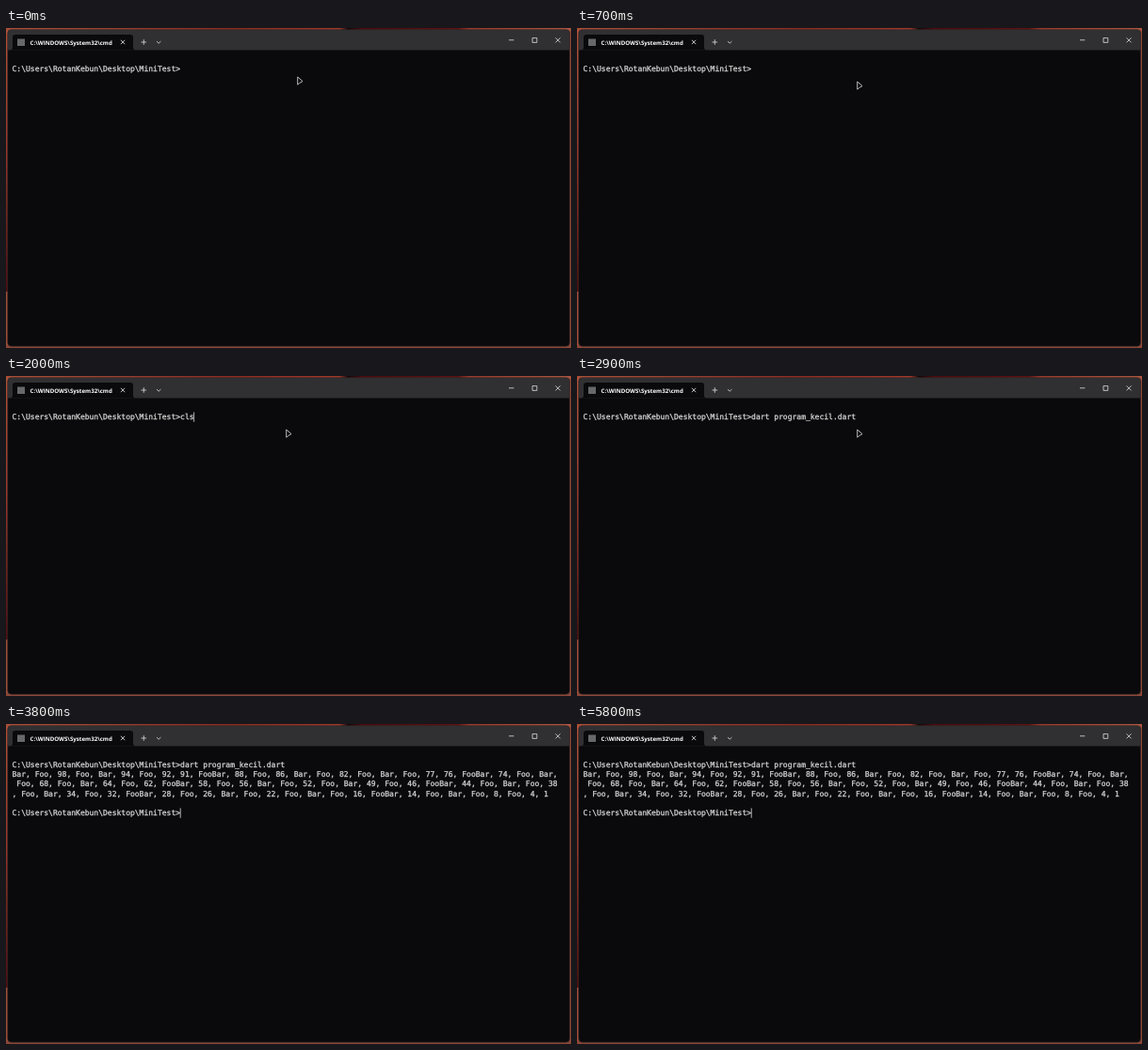
Write an HTML page that moves like this. It is 600 by 340 pixels and loops after 6000 ms.

```html
<!DOCTYPE html>
<html lang="en">
<head>
<meta charset="utf-8">
<title>Terminal</title>
<style>
  html, body { margin: 0; width: 100%; height: 100%; overflow: hidden; background: #a04c38; }
  svg { display: block; }
  text { white-space: pre; text-rendering: geometricPrecision; }
  #screen { font: 8.02px "DejaVu Sans Mono", monospace; fill: #d4d4d4; stroke: #d4d4d4; stroke-width: .28px; }
  .title { font: 700 6.15px "Open Sans", sans-serif; fill: #fff; }
  .icons { fill: none; stroke: #e0e0e0; stroke-width: .8; }
</style>
</head>
<body>
<svg width="600" height="340" viewBox="0 0 600 340">
  <defs>
    <linearGradient id="top">
      <stop offset="0" stop-color="#a84f38"/>
      <stop offset=".2" stop-color="#96402f"/>
      <stop offset=".4" stop-color="#8e2a20"/>
      <stop offset=".59" stop-color="#a03a2a"/>
      <stop offset=".605" stop-color="#140608"/>
      <stop offset=".63" stop-color="#4a0c0e"/>
      <stop offset=".8" stop-color="#5c1212"/>
      <stop offset=".82" stop-color="#9a3a2a"/>
      <stop offset="1" stop-color="#a85640"/>
    </linearGradient>
    <linearGradient id="side" x2="0" y2="1">
      <stop offset="0" stop-color="#b0523a"/>
      <stop offset=".45" stop-color="#97382a"/>
      <stop offset="1" stop-color="#4c0c0e"/>
    </linearGradient>
  </defs>
  <rect width="600" height="340" fill="#a04c38"/>
  <rect width="600" height="3" fill="url(#top)"/>
  <rect y="2" width="3" height="278" fill="url(#side)"/>
  <rect y="337" width="600" height="3" fill="#8a4636"/>

  <rect x="1.7" y="1.7" width="597" height="336.5" rx="4" fill="#0a090b" stroke="#3c2f2f" stroke-width=".6"/>
  <path d="M2 23.5V6a4 4 0 0 1 4-4H594.5a4 4 0 0 1 4 4V23.5Z" fill="#302f31"/>
  <path d="M4 23.5q3 0 3-3V10q0-3 3-3H132q3 0 3 3V20.5q0 3 3 3Z" fill="#0a090b"/>
  <rect x="12" y="11.5" width="8" height="7.5" fill="#66686a"/>
  <text class="title" x="25.5" y="17.7">C:\WINDOWS\System32\cmd</text>
  <g class="icons">
    <path d="M121.8 12.8l4.4 4.4m0-4.4l-4.4 4.4M143.5 15h5.6M146.3 12.2v5.6M160 14.2l2.2 2 2.2-2"/>
    <path d="M534 12.8h5.4M559 10.6h4.8v4.8h-4.8ZM583.6 10.4l5 5m0-5l-5 5"/>
  </g>

  <g id="screen"></g>
  <rect id="caret" width=".9" height="10.4" fill="#c4c4c4"/>
  <path id="pointer" d="M.7.6V8.8L2.7 7.1 6 5.2Z" fill="#0a090b" stroke="#cfcfcf" stroke-width=".9" stroke-linejoin="round"/>
</svg>
<script>
const LOOP = 6000, LEFT = 6.5, TOP = 38.4, COL = 4.828, ROW = 10.2, COLS = 120;
const PROMPT = "C:\\Users\\RotanKebun\\Desktop\\MiniTest>";
const COMMAND = "dart program_kecil.dart";
const [screen, caret, pointer] = ["screen", "caret", "pointer"].map(id => document.getElementById(id));

// The program's output: 100 down to 1 without primes, with Foo for 3 and Bar for 5.
function countdown() {
  const words = [];
  for (let n = 100; n > 0; n--) {
    let prime = n > 1;
    for (let d = 2; d * d <= n; d++) if (n % d === 0) prime = false;
    if (!prime) words.push((n % 3 ? "" : "Foo") + (n % 5 ? "" : "Bar") || n);
  }
  return words.join(", ");
}

const output = countdown();
const wrapped = [];
for (let i = 0; i < output.length; i += COLS) wrapped.push(output.slice(i, i + COLS));

const rows = Array.from({ length: 6 }, (_, i) => {
  const row = document.createElementNS("http://www.w3.org/2000/svg", "text");
  row.setAttribute("x", LEFT);
  row.setAttribute("y", 46 + i * ROW);
  return screen.appendChild(row);
});

// Start time, lines on the screen, caret shown
const steps = [
  [0, [PROMPT], false],
  [200, [PROMPT], true],
  [700, [PROMPT], false],
  [1300, [PROMPT], true],
  [1900, [PROMPT + "cl"], true],
  [2000, [PROMPT + "cls"], true],
  [2300, [PROMPT + COMMAND], true],
  [2900, [PROMPT + COMMAND], false],
  [3500, [PROMPT + COMMAND], true],
  [3600, [PROMPT + COMMAND, ""], true],
  ...[3800, 4200, 4800, 5300, 5800].map((t, i) =>
    [t, [PROMPT + COMMAND, ...wrapped, "", PROMPT], i % 2 === 0])
];

let shown;
function draw(now) {
  const t = now % LOOP;
  const step = steps.findLast(([start]) => start <= t);
  if (step !== shown) {
    shown = step;
    const [, lines, caretOn] = step;
    const last = lines.length - 1;
    rows.forEach((row, i) => row.textContent = lines[i] || "");
    caret.setAttribute("x", LEFT - .4 + lines[last].length * COL);
    caret.setAttribute("y", TOP + last * ROW);
    caret.style.visibility = caretOn ? "visible" : "hidden";
  }
  const move = Math.min(Math.floor(t / 100), 2);
  pointer.setAttribute("transform", `translate(${309 - 6 * move} ${51.4 + 2.5 * move})`);
  pointer.style.visibility = t < 3600 ? "visible" : "hidden";
}

const begin = performance.now();
function tick() {
  draw(performance.now() - begin);
  requestAnimationFrame(tick);
}
tick();
</script>
</body>
</html>
```
